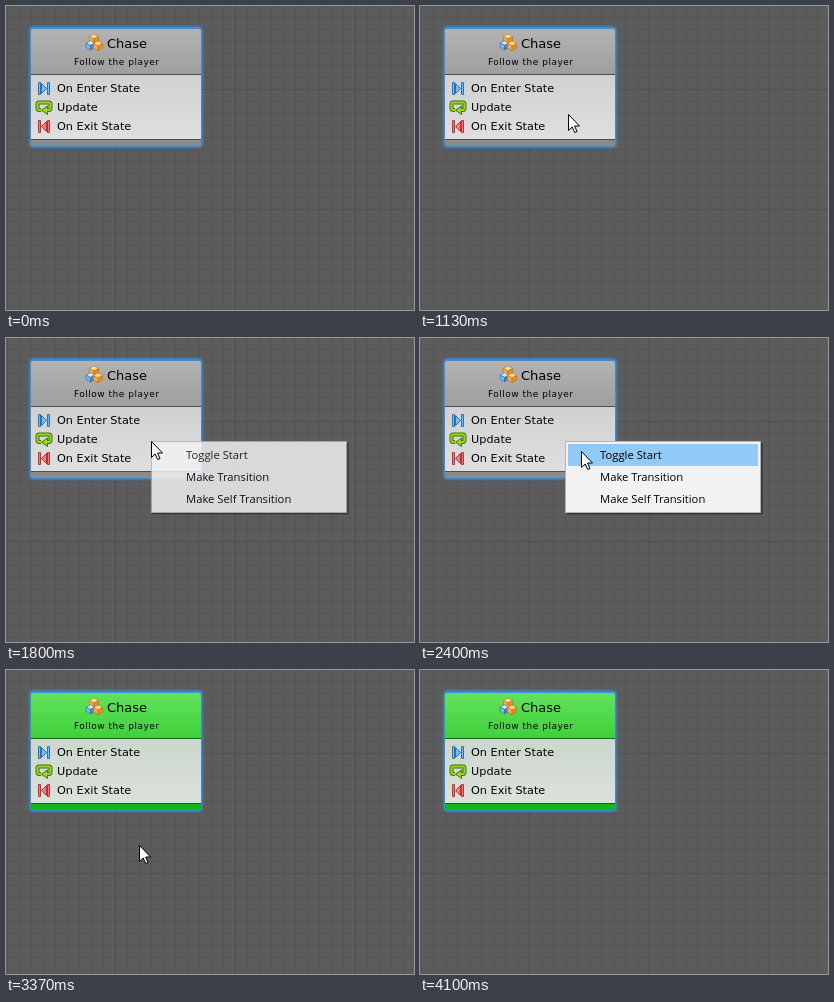
These frames come from a looping animation (408 by 304 pixels, 5.11 s). An HTML page:

```html
<!DOCTYPE html>
<html lang="en">
<head>
<meta charset="utf-8">
<title>Toggle start state</title>
<style>
  html, body { margin: 0; width: 100%; height: 100%; overflow: hidden; background: #5c5c5c; }
  svg { display: block; width: 408px; height: 304px; }
  .card text { font-family: "DejaVu Sans", Verdana, sans-serif; font-size: 11.25px; }
  .card .title { font-size: 13px; }
  .card .note { font-size: 9px; letter-spacing: .5px; }
  .menu text { font-family: "Open Sans", "Noto Sans", sans-serif; font-size: 11.25px; }
  .card { --top: #b3b3b3; --low: #9e9e9e; --foot: #8b8b8b; --body1: #d1d1d1; --body2: #dfdfdf; --rule: #4c4c4c; }
  .card.start { --top: #62e25c; --low: #3fd03b; --foot: #0dbb14; --body1: #cdd6cd; --body2: #dae2da; --rule: #17611a; }
</style>
</head>
<body>
<svg viewBox="0 0 408 304">
  <defs>
    <pattern id="minor" x="1" y="11" width="12" height="12" patternUnits="userSpaceOnUse">
      <path d="M0 0H12V1H1V12H0Z" fill="#565656"/>
    </pattern>
    <pattern id="major" x="109" y="83" width="120" height="120" patternUnits="userSpaceOnUse">
      <path d="M0 0H120V1H1V120H0Z" fill="#4e4e4e"/>
    </pattern>
    <linearGradient id="head" x2="0" y2="1">
      <stop style="stop-color:var(--top)"/><stop offset="1" style="stop-color:var(--low)"/>
    </linearGradient>
    <linearGradient id="body" x2="0" y2="1">
      <stop style="stop-color:var(--body1)"/><stop offset="1" style="stop-color:var(--body2)"/>
    </linearGradient>
    <filter id="soft" x="-10%" y="-10%" width="120%" height="120%"><feGaussianBlur stdDeviation="1"/></filter>
  </defs>

  <rect width="408" height="304" fill="#5c5c5c"/>
  <rect width="408" height="304" fill="url(#minor)"/>
  <rect width="408" height="304" fill="url(#major)"/>

  <g class="card" id="card">
    <rect x="23.5" y="20.5" width="173" height="121" rx="4" fill="#3d8fdc" filter="url(#soft)"/>
    <rect x="24.5" y="21.5" width="171" height="119" rx="3" fill="#3f8fd8"/>
    <!-- gradients live inside the card so that they follow its state -->
    <linearGradient id="headFill" x2="0" y2="1">
      <stop style="stop-color:var(--top)"/><stop offset="1" style="stop-color:var(--low)"/>
    </linearGradient>
    <linearGradient id="bodyFill" x2="0" y2="1">
      <stop style="stop-color:var(--body1)"/><stop offset="1" style="stop-color:var(--body2)"/>
    </linearGradient>
    <path d="M25 69V25Q25 23 27 23H193Q195 23 195 25V69Z" fill="url(#headFill)"/>
    <rect x="25" y="69" width="170" height="64" fill="url(#bodyFill)"/>
    <path d="M25 133H195V138Q195 140 193 140H27Q25 140 25 138Z" style="fill:var(--foot)"/>
    <path d="M25 68.5H195M25 133.5H195" style="stroke:var(--rule)"/>
    <g id="cubes" stroke-width=".5" stroke-linejoin="round"></g>
    <text class="title" x="101" y="42">Chase</text>
    <text class="note" x="68" y="59">Follow the player</text>
    <g fill="#79bdf0" stroke="#2a70b0">
      <path d="M32.5 76.5h2v12h-2zM41.5 76.5h2v12h-2zM35.5 77.5L40.5 82.5L35.5 87.5Z"/>
    </g>
    <g fill="none" stroke-linejoin="round">
      <path id="loop" d="M35 104H33Q31.5 104 31.5 102V98Q31.5 96.5 33 96.5H43Q44.5 96.5 44.5 98V102Q44.5 104 43 104H40" stroke="#3f7306" stroke-width="4"/>
      <path d="M41.5 100V108.5L35.5 104.2Z" fill="#9ad81e" stroke="#3f7306"/>
      <path d="M35 104H33Q31.5 104 31.5 102V98Q31.5 96.5 33 96.5H43Q44.5 96.5 44.5 98V102Q44.5 104 43 104H40" stroke="#9ad81e" stroke-width="2"/>
    </g>
    <g fill="#f08080" stroke="#b03434">
      <path d="M32.5 114.5h2v12h-2zM41.5 114.5h2v12h-2zM40.5 115.5L35.5 120.5L40.5 125.5Z"/>
    </g>
    <text x="51" y="86">On Enter State</text>
    <text x="51" y="105">Update</text>
    <text x="51" y="124">On Exit State</text>
  </g>

  <g class="menu">
    <g id="panel">
      <rect x="147" y="105" width="196" height="72" fill="#000" opacity=".22"/>
      <rect x="146" y="104" width="196" height="72" fill="#000" opacity=".3"/>
      <rect x="145.5" y="103.5" width="195" height="71" fill="#f2f2f2" stroke="#b4b4b4"/>
      <text x="180" y="143">Make Transition</text>
      <text x="180" y="165">Make Self Transition</text>
    </g>
    <g id="item">
      <rect id="hot" x="148" y="106" width="190" height="22" fill="#91c9f7"/>
      <text x="180" y="121">Toggle Start</text>
    </g>
  </g>

  <path id="cursor" d="M.5 .5V16.5L4.2 13L6.7 18.5L9 17.5L6.6 12H11.5Z" fill="#fff" stroke="#000" stroke-linejoin="round"/>
</svg>
<script>
const LOOP = 5110, TICKS_PER_MS = 3 / 100;
const $ = id => document.getElementById(id);
const card = $('card'), panel = $('panel'), item = $('item'), hot = $('hot'), cursor = $('cursor');

// Pointer keys: tick, x, y
const path = [
  [14, 303, 330], [16, 273, 302], [22, 201, 222], [31, 157, 127], [36, 145, 103],
  [62, 145, 103], [72, 161, 113], [91, 161, 113], [100, 138, 166], [101, 133, 175],
  [116, 77, 284], [122, 68, 302], [126, 66, 312]
];
const MENU_OPEN = 50, HOVER = 65, CLICK = 85;

function cube(x, y, s, [top, left, right, edge]) {
  const h = s * .55;
  const face = (d, fill) => `<path d="M${x} ${y}${d}Z" fill="${fill}" stroke="${edge}"/>`;
  return face(`l${-s} ${-h}l${s} ${-h}l${s} ${h}`, top) +
    face(`l${-s} ${-h}v${s}l${s} ${h}`, left) +
    face(`l${s} ${-h}v${s}l${-s} ${h}`, right);
}
const orange = ['#ffdc9a', '#ffab45', '#f08a1c', '#b8640e'];
const blue = ['#c9e6ff', '#75b8f2', '#3c8cda', '#285f9c'];
$('cubes').innerHTML = cube(88, 33, 4.6, orange) + cube(84.5, 39.5, 4.4, blue) + cube(92, 40, 4.6, orange);

const clamp = v => Math.min(1, Math.max(0, v));
const slope = (i, axis) => {
  const a = path[i], b = path[i + 1];
  return a && b ? (b[axis] - a[axis]) / (b[0] - a[0]) : 0;
};
const tangent = (i, axis) => {
  const a = slope(i - 1, axis), b = slope(i, axis);
  return a * b > 0 ? 2 * a * b / (a + b) : 0;
};

// Monotone cubic through the pointer keys
function pointer(tick, axis) {
  if (tick <= path[0][0]) return path[0][axis];
  const i = path.findIndex((key, n) => n + 1 < path.length && tick < path[n + 1][0]);
  if (i < 0) return path[path.length - 1][axis];
  const a = path[i], b = path[i + 1], span = b[0] - a[0];
  const u = (tick - a[0]) / span, v = 1 - u;
  return a[axis] * (1 + 2 * u) * v * v + b[axis] * u * u * (3 - 2 * u) +
    span * u * v * (tangent(i, axis) * v - tangent(i + 1, axis) * u);
}

function draw(now) {
  const tick = Math.floor((now % LOOP + 3.4) * TICKS_PER_MS);
  const clicked = tick >= CLICK;
  const menuAlpha = clamp((tick - MENU_OPEN + 1) / 6);
  card.classList.toggle('start', clicked);
  panel.setAttribute('opacity', clicked ? 0 : menuAlpha);
  item.setAttribute('opacity', clicked ? clamp(1 - (tick - CLICK + 1) / 11) : menuAlpha);
  hot.setAttribute('opacity', tick >= HOVER ? 1 : 0);
  const x = Math.round(pointer(tick, 1)), y = Math.round(pointer(tick, 2));
  cursor.setAttribute('transform', `translate(${x} ${y})`);
}

const begin = performance.now();
function frame() {
  draw(performance.now() - begin);
  requestAnimationFrame(frame);
}
frame();
</script>
</body>
</html>
```
